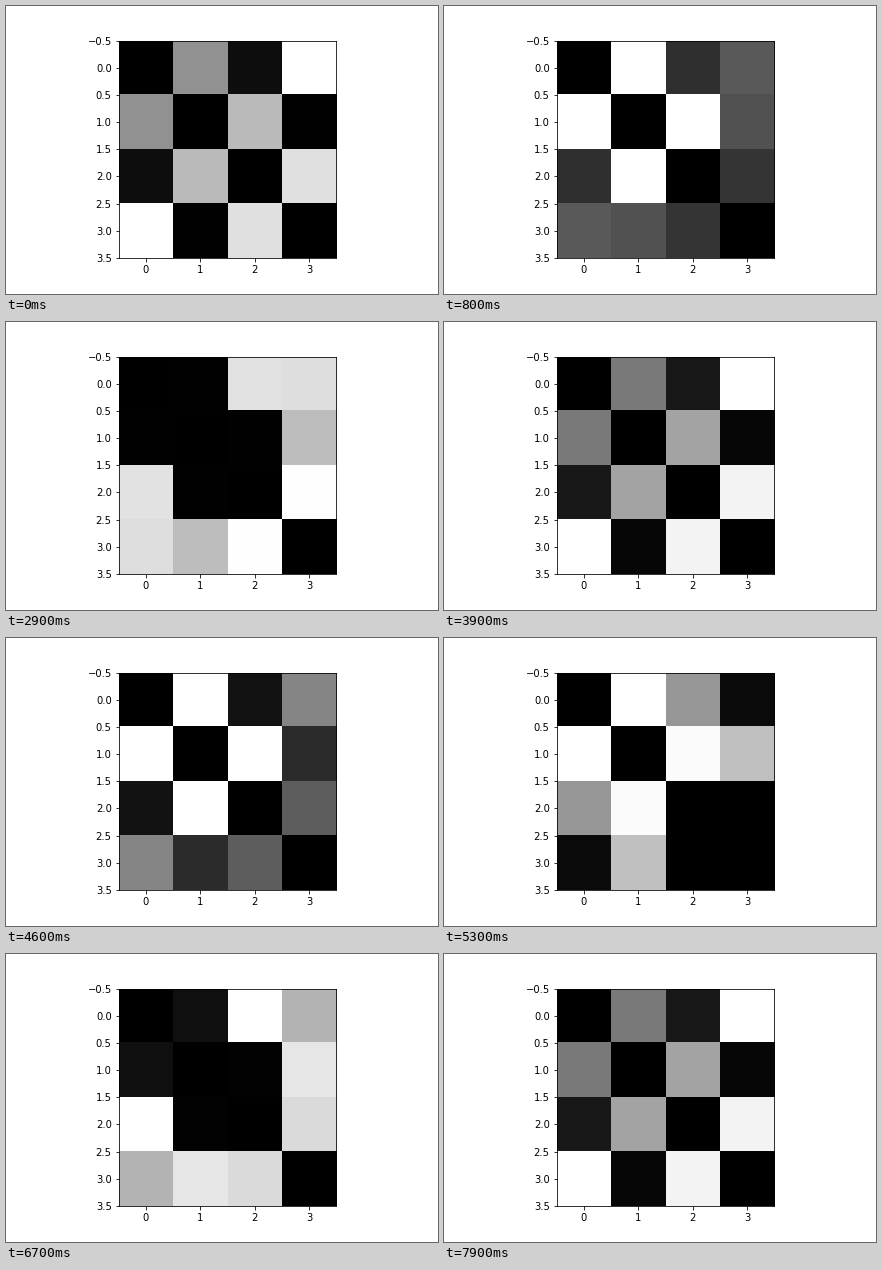
A matplotlib script for the animation above (8000 ms loop, 432 px wide and 288 px high).

```python
import numpy as np
import matplotlib.pyplot as plt
from matplotlib.animation import FuncAnimation

N = 4
FRAMES = 80
PERIOD = 40  # frames per full oscillation

rows, cols = np.triu_indices(N, k=1)
phases = 2.0 * np.arange(len(rows))


def weights(frame):
    """Symmetric matrix whose links oscillate with staggered phases."""
    w = np.zeros((N, N))
    w[rows, cols] = 1 + np.sin(2 * np.pi * frame / PERIOD - phases)
    return w + w.T


plt.rcParams["font.family"] = "DejaVu Sans"
fig, ax = plt.subplots(figsize=(6, 4), dpi=72, facecolor="white")
fig.subplots_adjust(left=0.125, right=0.9, bottom=0.125, top=0.88)

# The colour scale stays fixed to the range of the starting matrix.
start = weights(0)
image = ax.imshow(start, cmap="gray", vmin=0, vmax=start.max(),
                  interpolation="nearest")


def update(frame):
    image.set_data(weights(frame))
    return [image]


anim = FuncAnimation(fig, update, frames=FRAMES, interval=100,
                     repeat=True, repeat_delay=0)
plt.show()
```
